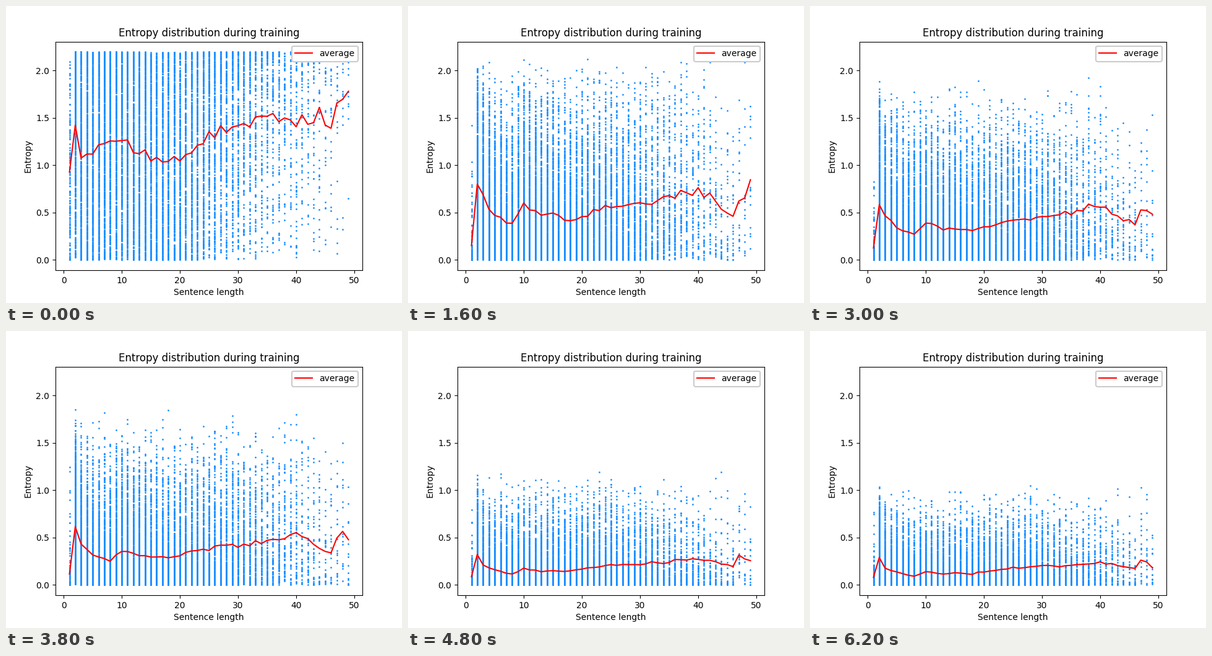
Animation, 640 px wide and 480 px high, one loop 6.4 s. Source, as a matplotlib script:

```python
import numpy as np
import matplotlib.pyplot as plt
from matplotlib.animation import FuncAnimation

FRAMES, INTERVAL = 32, 200
LENGTHS = np.arange(1, 50)

# Key points of the average curve early, midway and late in training.
KNOTS = [1, 2, 3, 5, 8, 10, 13, 18, 25, 33, 40, 46, 47, 49]
EARLY = [.96, 1.41, 1.05, 1.15, 1.23, 1.22, 1.12, 1.04, 1.29, 1.49, 1.53, 1.38, 1.55, 1.58]
MIDDLE = [.14, .80, .65, .46, .39, .56, .48, .43, .55, .62, .76, .46, .64, .74]
LATE = [.08, .28, .18, .13, .09, .14, .12, .12, .18, .20, .23, .17, .28, .19]

counts = (560 * np.exp(-((LENGTHS - 7) / 22) ** 2)).astype(int)
counts[:2] = 130, 700
column = np.repeat(LENGTHS, counts)


def progress(frame):
    """Training stage: 0 early, 1 middle, 2 late."""
    return np.interp(frame, [0, 8, 12, 19, 24, 31], [0, 1, 1.2, 1.3, 1.85, 2])


def average(stage, rng):
    """Blend the key curves geometrically and add a little jitter."""
    start, end = (EARLY, MIDDLE) if stage < 1 else (MIDDLE, LATE)
    blend = stage if stage < 1 else stage - 1
    knots = np.power(start, 1 - blend) * np.power(end, blend)
    jitter = .03 + .04 * (LENGTHS / 49) ** 4
    return np.interp(LENGTHS, KNOTS, knots) * (1 + jitter * rng.normal(size=LENGTHS.size))


def samples(curve, stage, rng):
    """Beta-distributed entropies whose mean follows the curve."""
    ceiling = np.interp(stage, [1, 1.2, 2], [2.195, 2.0, 1.1])
    focus = np.interp(stage, [0, 1], [1.8, 3.5])
    mean = np.clip(curve / ceiling, .02, .9)[column - 1]
    return ceiling * rng.beta(focus * mean, focus * (1 - mean))


fig, ax = plt.subplots(figsize=(6.4, 4.8), dpi=100)
dots = ax.scatter(column, np.zeros(column.size), s=1, color="dodgerblue")
line, = ax.plot(LENGTHS, np.zeros(LENGTHS.size), color="red", label="average")
ax.set(xlim=(-1.4, 51.4), ylim=(-.1095, 2.304), xlabel="Sentence length",
       ylabel="Entropy", title="Entropy distribution during training")
legend = ax.legend(loc="upper right", framealpha=1)
legend.get_frame().set_linewidth(1.5)


def update(frame):
    rng = np.random.default_rng(100 + frame)
    stage = progress(frame)
    curve = average(stage, rng)
    line.set_ydata(curve)
    dots.set_offsets(np.column_stack([column, samples(curve, stage, rng)]))
    return dots, line


anim = FuncAnimation(fig, update, frames=FRAMES, interval=INTERVAL,
                     init_func=lambda: update(0), repeat=True, repeat_delay=0)
plt.show()
```
